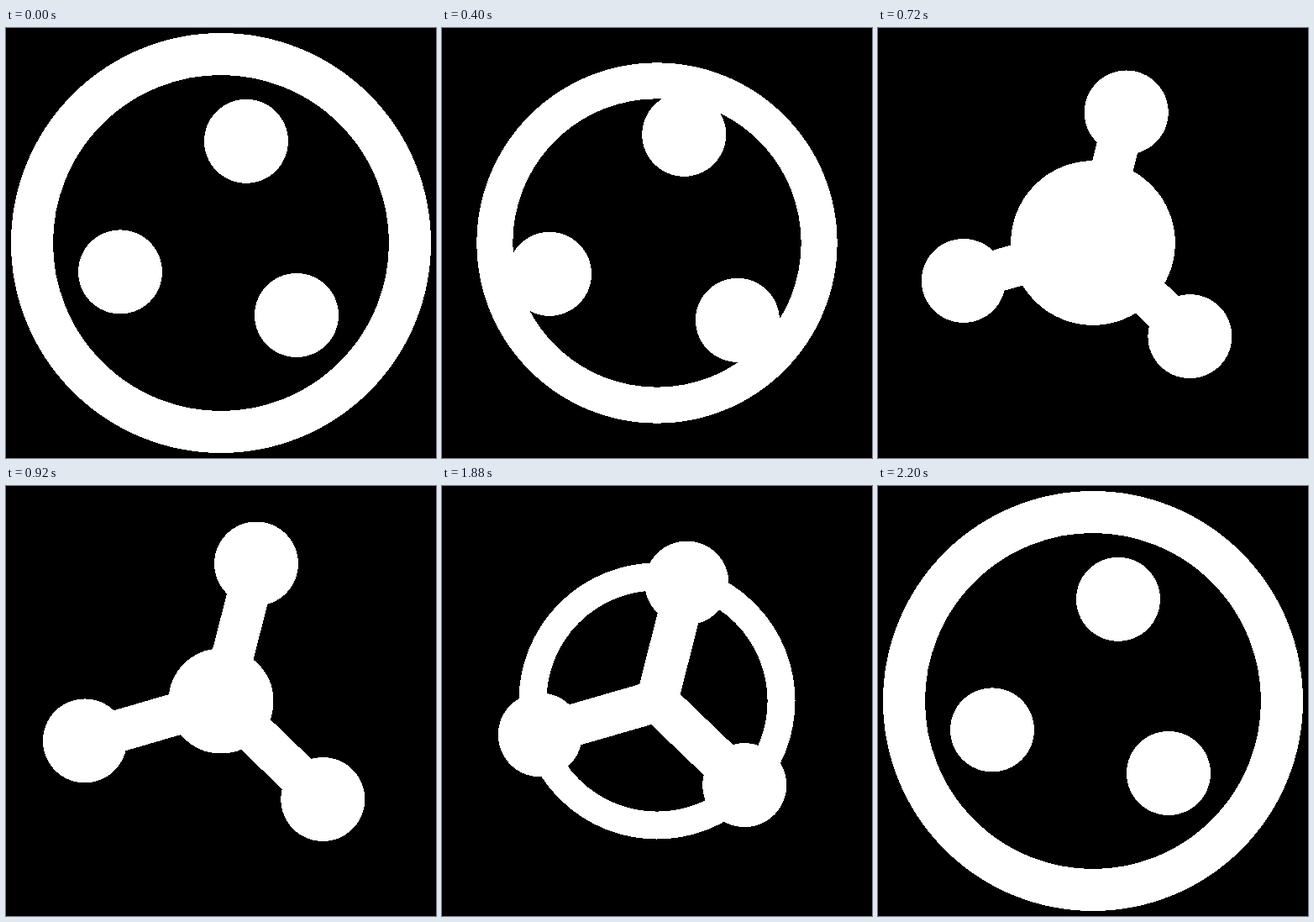
Write an HTML page that moves like this. It is 512 px wide and 512 px high and loops after 2440 ms.

```html
<!DOCTYPE html>
<html lang="en">
<head>
<meta charset="utf-8">
<title>Ring to molecule</title>
<style>
  html, body { margin: 0; width: 100%; height: 100%; overflow: hidden; background: #000; }
  svg { display: block; width: 100%; height: 100%; shape-rendering: crispEdges; }
</style>
</head>
<body>
<svg id="stage" viewBox="0 0 512 512"></svg>
<script>
const LOOP = 2440, STEP = 40, MID = 256;
const OPEN = [200, 920], CLOSE = [1520, 2200];
const LINES_FROM = 0.33, FILL_FROM = 0.75;

// Ball centres: [x, y] inside the ring, then [x, y] at full reach
const paths = [
  [286, 134.8, 298, 92.5],
  [136, 290.4, 93.9, 303.4],
  [346, 342, 377.3, 373]
];

const stage = document.getElementById('stage');

function add(tag, attrs) {
  const el = document.createElementNS('http://www.w3.org/2000/svg', tag);
  set(el, attrs);
  return stage.appendChild(el);
}

function set(el, attrs) {
  for (const key in attrs) el.setAttribute(key, attrs[key]);
}

const ring = add('circle', { cx: MID, cy: MID, stroke: '#fff' });
const lines = paths.map(() => add('line', { x1: MID, y1: MID, stroke: '#fff', 'stroke-width': 50 }));
const balls = paths.map(() => add('circle', { r: 50, fill: '#fff' }));

const mix = (a, b, p) => a + (b - a) * p;

function ease(time, [from, to]) {
  const t = Math.min(1, Math.max(0, (time - from) / (to - from)));
  return t * t * (3 - 2 * t);
}

function draw(time) {
  const p = ease(time, OPEN) - ease(time, CLOSE);
  const scale = mix(1, 0.25, p);
  set(ring, {
    r: 225 * scale,
    'stroke-width': 50 * scale,
    fill: p > FILL_FROM ? '#fff' : 'none'
  });
  paths.forEach(([x0, y0, x1, y1], i) => {
    const x = mix(x0, x1, p), y = mix(y0, y1, p);
    set(balls[i], { cx: x, cy: y });
    set(lines[i], { x2: x, y2: y, visibility: p > LINES_FROM ? 'visible' : 'hidden' });
  });
}

const start = performance.now();

function tick() {
  const time = (performance.now() - start) % LOOP;
  draw(Math.floor(time / STEP) * STEP);
  requestAnimationFrame(tick);
}
tick();
</script>
</body>
</html>
```
